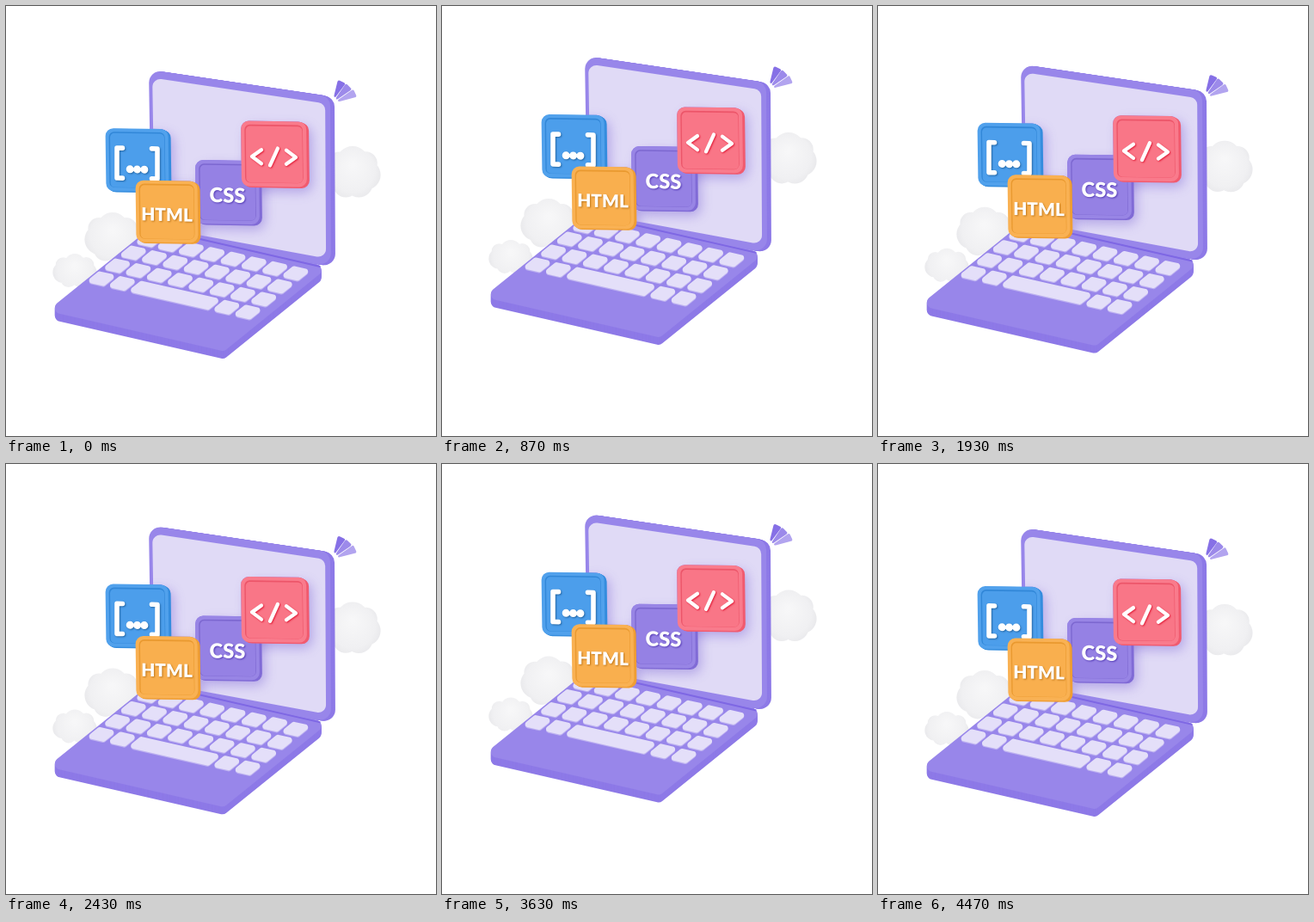
An HTML page with a canvas for the animation above (5.01 s loop, 500 by 500 pixels).

```html
<!DOCTYPE html>
<html lang="en">
<head>
<meta charset="utf-8">
<title>Floating laptop with code tiles</title>
<style>
html, body { margin: 0; width: 100%; height: 100%; overflow: hidden; background: #fff; }
canvas { display: block; width: 500px; height: 500px; }
</style>
</head>
<body>
<canvas id="stage" width="500" height="500"></canvas>
<script>
const ctx = document.getElementById('stage').getContext('2d');
const LOOP = 5010;
const FPS = 30;
const TURNS = [0, 1118, 2293, 3419, 4470]; // moments at rest, top, rest, top, rest
const RISE = -20.7;

const mix = (a, b, k) => a + (b - a) * k;
const hsl = (h, s, l) => `hsl(${h} ${s}% ${l}%)`;
const violet = l => hsl(251, 70, l);

// Straight up and down at even speed, then a pause until the loop ends.
function bobOffset(t) {
  const leg = TURNS.findIndex(turn => turn > t);
  if (leg < 0) return 0;
  const k = (t - TURNS[leg - 1]) / (TURNS[leg] - TURNS[leg - 1]);
  return RISE * (leg % 2 ? k : 1 - k);
}

// Maps u, v in a slanted grid, or in a quad given by its corners, to the stage.
const grid = (origin, across, along) => (u, v) =>
  [0, 1].map(i => origin[i] + across[i] * u + along[i] * v);
const quad = (tl, tr, br, bl) => (u, v) =>
  [0, 1].map(i => mix(mix(tl[i], tr[i], u), mix(bl[i], br[i], u), v));

function trace(map, [u0, v0, u1, v1], radius, dx = 0, dy = 0) {
  const corners = [map(u0, v0), map(u1, v0), map(u1, v1), map(u0, v1)].map(([x, y]) => [x + dx, y + dy]);
  const start = [0, 1].map(i => (corners[0][i] + corners[3][i]) / 2);
  ctx.beginPath();
  ctx.moveTo(...start);
  corners.forEach((c, i) => ctx.arcTo(...c, ...(corners[i + 1] || start), radius));
  ctx.closePath();
}

function panel(map, area, radius, color, dx, dy) {
  trace(map, area, radius, dx, dy);
  ctx.fillStyle = color;
  ctx.fill();
}

// A thick panel: copies stacked from the far side to the front face.
function slab(map, area, radius, depth, dx, dy, side, face) {
  for (let d = depth; d > 0; d--) panel(map, area, radius, side, dx * d, dy * d);
  panel(map, area, radius, face);
}

const KEYS = grid([111, 317], [24.3, 5.55], [18.6, -15]);
const BASE_AREA = [-0.52, -2.7, 7.93, 3.85];
const SCREEN = quad([166, 74], [377, 105], [378, 303], [169, 264]);
const DISPLAY_AREA = [0.019, 0.047, 0.972, 0.957];

function cloud(x, y, halfW, halfH) {
  const g = ctx.createRadialGradient(x, y - halfH * 0.3, 2, x, y, halfW * 1.1);
  g.addColorStop(0, '#f7f7f8');
  g.addColorStop(0.7, '#f0f0f2');
  g.addColorStop(1, '#e6e6e9');
  ctx.fillStyle = g;
  ctx.beginPath();
  for (let i = 0; i < 7; i++) {
    const a = i * Math.PI * 2 / 7 - Math.PI / 2;
    const r = halfH * (0.53 + 0.09 * Math.cos(i * 2.6));
    const px = x + Math.cos(a) * (halfW - r), py = y + Math.sin(a) * (halfH - r);
    ctx.moveTo(px + r, py);
    ctx.arc(px, py, r, 0, Math.PI * 2);
  }
  ctx.fill();
}

function drawSparks() {
  for (let i = 0; i < 3; i++) {
    ctx.save();
    ctx.translate(382 + 2 * i, 106 + 2.2 * i);
    ctx.rotate((-65 + 20 * i) * Math.PI / 180);
    const petal = quad([0, -1], [20 + i, -5], [20 + i, 5], [0, 1]);
    panel(petal, [0, 0, 1, 1], 2, violet(67 + 6 * i));
    ctx.restore();
  }
}

function drawBase() {
  slab(KEYS, BASE_AREA, 7, 9, 0, 1, violet(69), violet(72));
  ctx.strokeStyle = violet(65);
  ctx.lineWidth = 2;
  ctx.beginPath();
  ctx.moveTo(...KEYS(1.8, 3.75));
  ctx.lineTo(...KEYS(7.6, 3.75));
  ctx.stroke();
  const key = (col, row, half) => {
    const area = [col - half, row - 0.42, col + half, row + 0.42];
    panel(KEYS, area, 3.4, violet(82), 0, 1.2);
    panel(KEYS, area, 3.4, hsl(252, 68, 92.5));
  };
  for (let row = 3; row >= 0; row--) {
    for (let col = 0; col < 8; col++) {
      if (row || col < 2 || col > 5) key(col, row, 0.44);
    }
  }
  key(3.5, 0, 1.94);
}

function strokes(width, ...lines) {
  ctx.lineWidth = width;
  ctx.lineCap = ctx.lineJoin = 'round';
  ctx.strokeStyle = '#fff';
  ctx.beginPath();
  for (const line of lines) line.forEach(([x, y], i) => i ? ctx.lineTo(x, y) : ctx.moveTo(x, y));
  ctx.stroke();
}

function label(text, size) {
  ctx.font = `900 ${size}px Lato, sans-serif`;
  ctx.textAlign = 'center';
  ctx.fillStyle = '#fff';
  ctx.fillText(text, 0, size * 0.36);
}

function ellipsisInBrackets() {
  const bracket = dir => [[17, -17], [23.5, -17], [23.5, 18], [17, 18]].map(([x, y]) => [x * dir, y]);
  strokes(5.6, bracket(-1), bracket(1));
  strokes(9, ...[-8.3, 0, 8.3].map(x => [[x, 7.5], [x + 0.1, 7.5]]));
}

function closingTag() {
  const chevron = dir => [[14.5, -8], [25.5, 0], [14.5, 8]].map(([x, y]) => [x * dir, y]);
  strokes(4.3, chevron(-1), [[4.5, -10], [-4.5, 10]], chevron(1));
}

// x, y is the middle of the front face; colour is hue, saturation, lightness.
const TILES = [
  { x: 152.5, y: 179, size: 73, color: [209, 80, 61], glyph: ellipsisInBrackets },
  { x: 257.5, y: 216.5, size: 74, color: [252, 65, 70], glyph: () => label('CSS', 23.7) },
  { x: 187, y: 239, size: 72, color: [34, 93, 64], glyph: () => label('HTML', 20.8) },
  { x: 311.5, y: 172, size: 76, color: [352, 92, 72], glyph: closingTag }
];

const tileMap = ({ x, y, size }) => grid([x, y], [size, 1], [1, size]);
const tileArea = inset => [inset - 0.5, inset - 0.5, 0.5 - inset, 0.5 - inset];

// Shadows fall on the display only.
function drawTileShadows() {
  ctx.save();
  trace(SCREEN, DISPLAY_AREA, 9);
  ctx.clip();
  ctx.shadowColor = 'rgba(105, 80, 205, .4)';
  ctx.shadowBlur = 14;
  ctx.shadowOffsetX = 6;
  ctx.shadowOffsetY = 6;
  for (const tile of TILES) panel(tileMap(tile), tileArea(0), 9, violet(70));
  ctx.restore();
}

function drawTile(tile) {
  const { x, y, color: [h, s, l], glyph } = tile;
  const map = tileMap(tile);
  slab(map, tileArea(0), 9, 3, 1, 0.5, hsl(h, s - 8, l - 7), hsl(h, s, l + 1));
  panel(map, tileArea(0.055), 6, hsl(h, s - 12, l - 9));
  panel(map, tileArea(0.068), 5, hsl(h, s, l), 0.4, 0.7);
  ctx.save();
  ctx.transform(1, 0.022, 0, 1, x, y + 3.5);
  ctx.shadowColor = hsl(h, s - 15, l - 22);
  ctx.shadowBlur = 2;
  ctx.shadowOffsetX = ctx.shadowOffsetY = 1;
  glyph();
  ctx.restore();
}

function drawScene(offset) {
  ctx.setTransform(1, 0, 0, 1, 0, 0);
  ctx.fillStyle = '#fff';
  ctx.fillRect(0, 0, 500, 500);
  ctx.translate(0, offset);
  cloud(403, 193.5, 33, 30.5);
  cloud(124, 269, 33, 29);
  cloud(80, 308, 26, 20);
  drawSparks();
  slab(SCREEN, [0, 0, 1, 1], 13, 5, 1, 0.2, violet(69), violet(72));
  panel(SCREEN, DISPLAY_AREA, 9, hsl(254, 62, 91));
  drawTileShadows();
  drawBase();
  TILES.forEach(drawTile);
}

let start = null;
function tick(now) {
  start ??= now;
  const t = (now - start) % LOOP;
  const frame = Math.floor((t + 3.4) * FPS / 1000);
  drawScene(bobOffset(frame * 1000 / FPS));
  requestAnimationFrame(tick);
}
requestAnimationFrame(tick);
</script>
</body>
</html>
```
